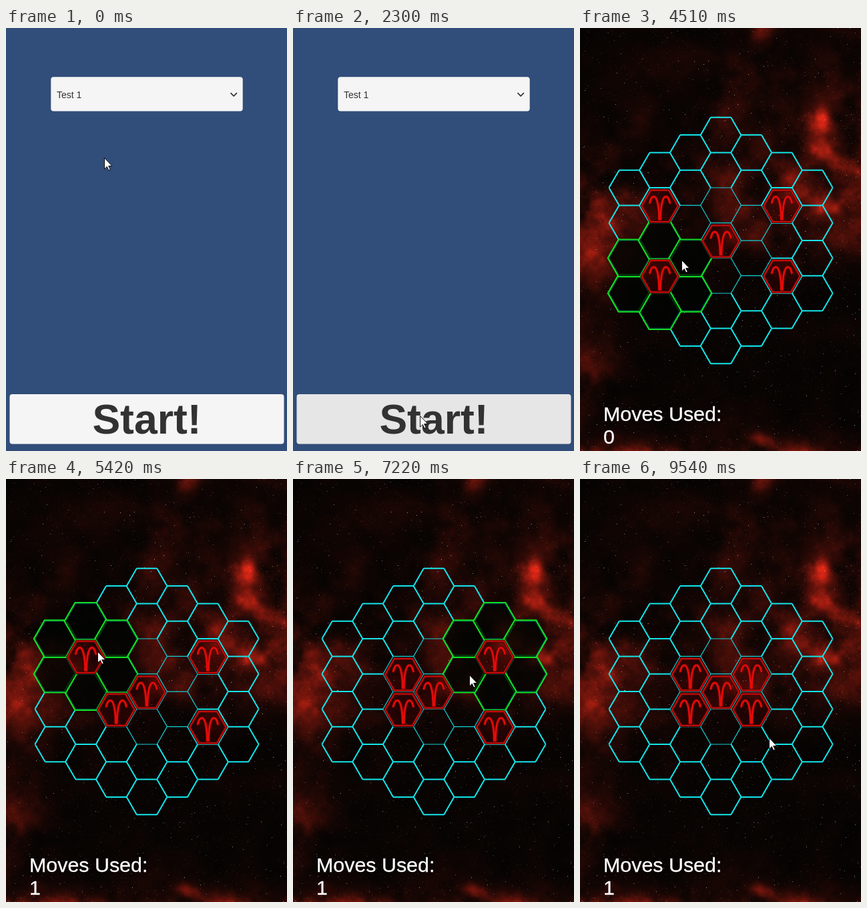
An HTML page with a canvas for the animation above (9570 ms loop, 421 by 633 pixels).

```html
<!DOCTYPE html>
<html lang="en">
<head>
<meta charset="utf-8">
<title>Hex puzzle</title>
<style>
html, body { margin: 0; width: 100%; height: 100%; overflow: hidden; background: #000; }
canvas, svg { position: absolute; left: 0; top: 0; width: 421px; height: 633px; }
text { font-family: "Liberation Sans", Arial, sans-serif; }
</style>
</head>
<body>
<canvas id="space" width="421" height="633"></canvas>
<svg viewBox="0 0 421 633">
  <defs>
    <path id="horns" d="M-1 20C-1 6-3-14-9-14Q-13-14-15-5M1 20C1 6 3-14 9-14Q13-14 15-5"/>
    <g id="token" fill="none" stroke-linecap="round">
      <polygon class="hex" fill="#900" fill-opacity=".14" stroke="#500" stroke-width="4"/>
      <polygon class="hex" stroke="#c40c0a" stroke-width="2"/>
      <use href="#horns" stroke="#600" stroke-width="4.6"/>
      <use href="#horns" stroke="#e00c0a" stroke-width="2.8"/>
    </g>
  </defs>
  <g id="game">
    <path id="thick" fill="none" stroke="#14e6ea" stroke-width="2"/>
    <path id="thin" fill="none" stroke="#12d0d6" stroke-width="1.2"/>
    <g id="marks" fill="#000402" fill-opacity=".78" stroke="#12dc28" stroke-width="2.2"></g>
    <g id="tokens"></g>
    <g fill="#fff" stroke="#fff" stroke-width=".3" font-size="30.4">
      <text x="35" y="588">Moves Used:</text>
      <text id="count" x="35" y="622">0</text>
    </g>
  </g>
  <g id="menu" fill="#323232">
    <rect width="421" height="633" fill="#314d79"/>
    <rect x="67.3" y="73.2" width="287.4" height="51.4" rx="4" fill="#f5f5f5"/>
    <text x="76" y="105" font-size="14">Test 1</text>
    <path d="M336.5 97.2l4.7 4.6 4.7-4.6" fill="none" stroke="#323232" stroke-width="1.7"/>
    <rect id="button" x="5.5" y="548" width="411" height="74.6" rx="4"/>
    <text x="211" y="606.5" font-size="62.5" font-weight="bold" text-anchor="middle">Start!</text>
  </g>
  <path id="cursor" d="M.5.5V17l3.8-3.6 2.6 5.7 2.4-1-2.6-5.6h5.2z" fill="#fff" stroke="#000" stroke-width=".9"/>
</svg>
<script>
const W = 421, H = 633, LOOP = 9570, CLICK = 1860, GAME = 2330;
const SIDE = 30.45, COL = 45.7, HALF = 26.3;
const $ = id => document.getElementById(id);
const smooth = s => s * s * (3 - 2 * s);
const bell = (d, width) => Math.exp(-((d / width) ** 2));

// Cells are addressed by column q and half-row k from the centre
const at = (q, k) => [211 + q * COL, 318 + k * HALF];
const six = fn => Array.from({ length: 6 }, (_, i) => fn(i * Math.PI / 3));
const corners = (x, y, r) => six(a => [(x + r * Math.cos(a)).toFixed(1), (y + r * Math.sin(a)).toFixed(1)]);
const sides = six(a => [Math.round(Math.cos(a + Math.PI / 6) * 1.15), Math.round(2 * Math.sin(a + Math.PI / 6))]);

function add(parent, tag, attrs = {}) {
  const el = document.createElementNS("http://www.w3.org/2000/svg", tag);
  for (const name in attrs) el.setAttribute(name, attrs[name]);
  return parent.appendChild(el);
}

// Seeded value noise
function hash(x, y) {
  let n = Math.imul(x, 374761393) + Math.imul(y, 668265263) | 0;
  n = Math.imul(n ^ n >>> 13, 1274126177);
  return ((n ^ n >>> 16) >>> 0) / 2 ** 32;
}

function noise(x, y) {
  const i = Math.floor(x), j = Math.floor(y), u = smooth(x - i), v = smooth(y - j);
  const top = hash(i, j) * (1 - u) + hash(i + 1, j) * u;
  const low = hash(i, j + 1) * (1 - u) + hash(i + 1, j + 1) * u;
  return top * (1 - v) + low * v;
}

function cloud(x, y) {
  let sum = 0;
  for (let o = 0, f = 1 / 45, a = .5; o < 6; o++, f *= 2, a *= .55) sum += a * noise(x * f + 9 * o, y * f);
  return sum;
}

// A tilted band brightening to both sides, a streak, the lower edges and three knots
function nebula(px, py) {
  const x = px + 36 * (cloud(px + 500, py) - .52), y = py + 36 * (cloud(px, py + 900) - .52);
  const band = bell(y - 290 + .18 * x, 85) * (.1 + .34 * ((x - 200) / 210) ** 2);
  const streak = .12 * bell(x - 272 + .38 * y, 22) * bell(y - 90, 130);
  const haze = .02 + .06 * bell(y - 60, 160) * x / W;
  const edge = .3 * Math.exp((py - H) / 14) + .16 * bell(x, 50) * bell(y - 520, 70);
  const knots = .65 * bell(Math.hypot(x - 361, y - 136), 17)
    + .45 * bell(Math.hypot(x - 276, y - 624), 13)
    + .22 * bell(Math.hypot(x - 18, y - 330), 26);
  return Math.min(1, (band + streak + haze + edge) * (1.9 * cloud(px, py)) ** 2 + knots);
}

function paintSpace() {
  const g = $("space").getContext("2d"), img = g.createImageData(W, H);
  for (let y = 0, p = 0; y < H; y++) for (let x = 0; x < W; x++, p += 4) {
    const v = nebula(x, y);
    img.data.set([4 + 222 * v, 3 + 36 * v, 2 + 20 * v, 255], p);
  }
  g.putImageData(img, 0, 0);
  for (let i = 0; i < 2600; i++) {
    const glow = hash(i, 73);
    g.globalAlpha = .12 + .6 * glow ** 8;
    g.fillStyle = ["#cde", "#fca", "#9cc"][i % 3];
    const size = glow > .998 ? 2 : 1;
    g.fillRect(Math.floor(hash(i, 71) * W), Math.floor(hash(i, 72) * H), size, size);
  }
}

// Inner cells claim their edges first and draw them thin
function buildBoard() {
  const cells = [];
  for (let q = -3; q <= 3; q++) {
    const end = 6 - Math.abs(q);
    for (let k = -end; k <= end; k += 2)
      cells.push({ q, k, ring: (Math.abs(q) + Math.max(Math.abs(q), Math.abs(k))) / 2 });
  }
  cells.sort((a, b) => a.ring - b.ring);
  const seen = new Set(), lines = { thin: "", thick: "" };
  for (const { q, k, ring } of cells) {
    const c = corners(...at(q, k), SIDE);
    sides.forEach(([dq, dk], i) => {
      const key = `${2 * q + dq},${2 * k + dk}`;
      if (seen.has(key)) return;
      seen.add(key);
      lines[ring < 2 ? "thin" : "thick"] += `M${c[i]}L${c[(i + 1) % 6]}`;
    });
  }
  for (const id in lines) $(id).setAttribute("d", lines[id]);
}

// Each token is dragged one cell towards the centre
const moves = [
  { sx: -1, sy: 1, press: 4000, release: 4670 },
  { sx: -1, sy: -1, press: 5420, release: 5950 },
  { sx: 1, sy: -1, press: 6820, release: 7350 },
  { sx: 1, sy: 1, press: 8150, release: 9040 },
  { sx: 0, sy: 0, press: LOOP, release: LOOP }
];

function buildPiece(move) {
  const { sx, sy } = move;
  move.token = add($("tokens"), "use", { href: "#token" });
  move.mark = add($("marks"), "g");
  for (const [dq, dk] of sides)
    add(move.mark, "polygon", { points: corners(...at(2 * sx + dq, 2 * sy + dk), 32.1).join(" ") });
}

// Cursor stops: arrival time, x, y
const stops = [
  [1240, 184, 619], [1590, 190, 580], [3690, 136, 372], [4510, 152, 347],
  [5190, 137, 258], [5850, 152, 282], [6570, 282, 269], [7220, 264, 293],
  [8000, 284, 360], [8590, 255, 339], [9540, 283, 387]
];

function cursorAt(t) {
  let x = 147, y = 194;
  for (const [end, ex, ey] of stops) {
    const far = Math.hypot(ex - x, ey - y), time = 46 * Math.sqrt(far);
    if (t <= end - time) break;
    const s = smooth(Math.min(1, 1 - (end - t) / time));
    x += (ex - x) * s + .056 * far * s * (1 - s);
    y += (ey - y) * s;
  }
  return [Math.round(x), Math.round(y)];
}

const show = (el, on) => el.style.display = on ? "" : "none";

function draw(t) {
  const [x, y] = cursorAt(t);
  show($("menu"), t < GAME);
  show($("game"), t >= GAME);
  $("button").setAttribute("fill", t >= CLICK ? "#e6e6e6" : y >= 548 ? "#ebebeb" : "#f5f5f5");
  $("cursor").setAttribute("transform", `translate(${x} ${y})`);
  $("count").textContent = t < moves[0].release ? 0 : 1;
  for (const { sx, sy, press, release, token, mark } of moves) {
    const far = t < release ? 2 : 1, [px, py] = at(far * sx, far * sy);
    token.setAttribute("transform", `translate(${px} ${py + 1})`);
    show(mark, t >= press && t < release);
  }
}

paintSpace();
buildBoard();
moves.forEach(buildPiece);
for (const el of document.querySelectorAll(".hex")) el.setAttribute("points", corners(0, 0, 27.2).join(" "));

const start = performance.now();
function tick() {
  draw((performance.now() - start) % LOOP);
  requestAnimationFrame(tick);
}
tick();
</script>
</body>
</html>
```
